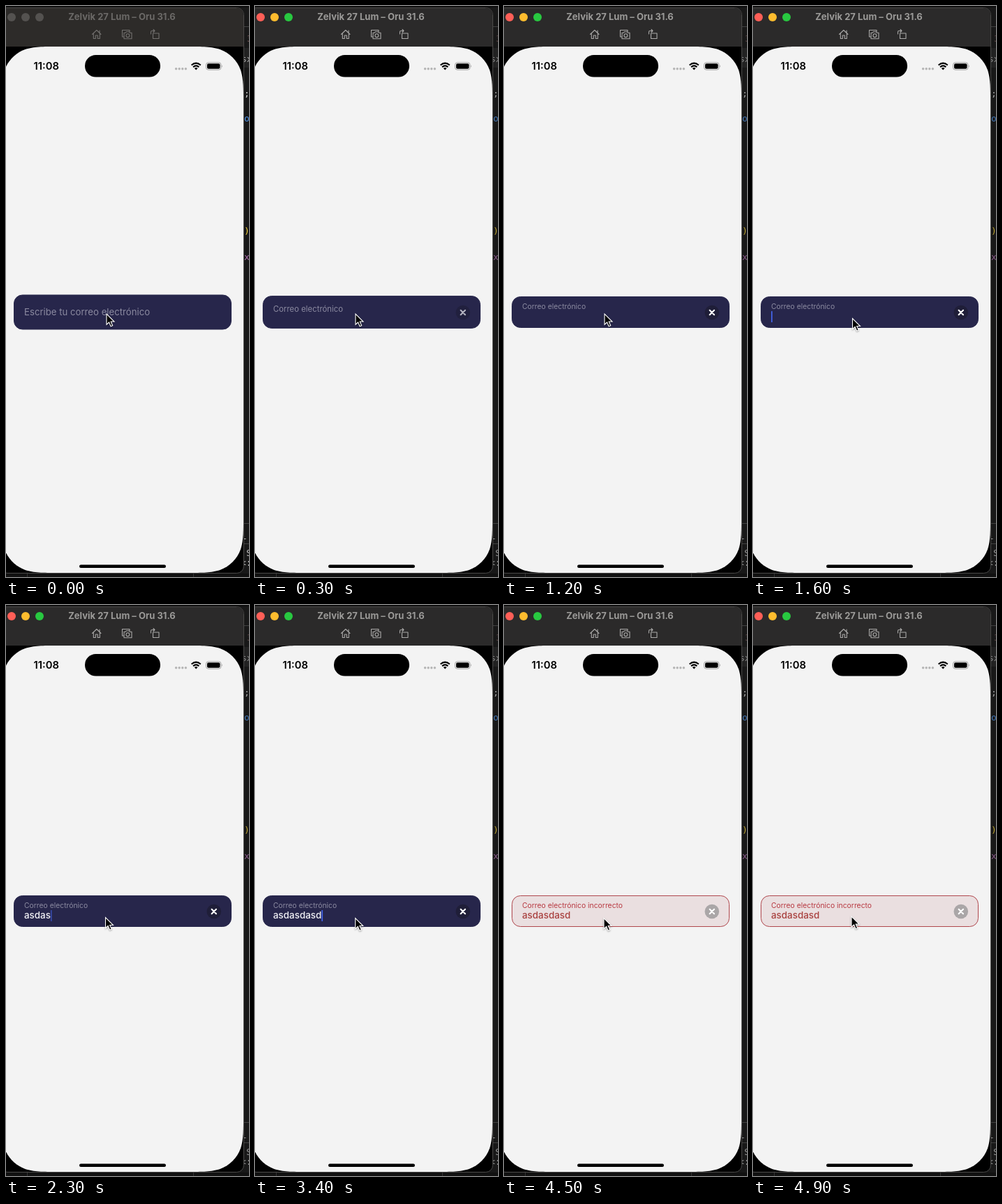
Write an HTML page that moves like this. It is 348x816 px and loops after 5000 ms.

```html
<!DOCTYPE html>
<html lang="es">
<head>
<meta charset="utf-8">
<title>Campo de correo</title>
<style>
  html, body { margin: 0; width: 100%; height: 100%; overflow: hidden; background: #181818; }
  svg { display: block; font-family: Inter, "Open Sans", sans-serif; }
  .code { font: 13px "DejaVu Sans Mono", "Noto Sans Mono", monospace; }
  .icons { fill: none; stroke-width: 1.1; stroke-linejoin: round; stroke-linecap: round; }
  #value { font-size: 13.4px; font-weight: 500; }
  #cursor { filter: drop-shadow(0 1px 1px rgba(0, 0, 0, .35)); }
</style>
</head>
<body>
<svg width="348" height="816" viewBox="0 0 348 816">
  <!-- editor behind the window -->
  <rect width="348" height="816" fill="#181818"/>
  <rect width="348" height="2" fill="#0d0d0d"/>
  <path d="M341 29.5H348M341 739.5H348M341 768.5H348" stroke="#414141"/>
  <rect x="341" y="60" width="7" height="28" fill="#222"/>
  <rect y="811" width="348" height="5" fill="#111"/>
  <path d="M30.5 811V816M268.5 811V816" stroke="#333"/>
  <g class="code" id="code">
    <text x="345" y="51" fill="#6e5050">3</text>
    <text x="337" y="80" fill="#aaa">sx</text>
    <text x="341" y="129" fill="#d4d4d4">;</text>
    <text x="341" y="165" fill="#4f94e8">o</text>
    <text x="341" y="326" fill="#f2d13a">)</text>
    <text x="341" y="363" fill="#b070b0">x</text>
    <text x="338" y="765" fill="#bbb">-</text>
    <text x="344" y="786" fill="#bbb">S</text>
    <text x="336" y="800" fill="#ccc">&lt;:</text>
  </g>

  <!-- simulator window -->
  <rect x="-8" y="2.5" width="348.5" height="808" rx="10" fill="#000" stroke="#4b4a49"/>
  <path id="bar" d="M0 3H330Q340 3 340 13V58H0Z"/>
  <g id="lights">
    <circle cx="8" cy="16" r="6"/><circle cx="28" cy="16" r="6"/><circle cx="48" cy="16" r="6"/>
  </g>
  <text id="title" x="166" y="20" text-anchor="middle" font-size="13" font-weight="700">Zelvik 27 Lum – Oru 31.6</text>
  <g class="icons" id="icons">
    <path d="M123.5 40.5L129.8 34.5L136 40.5M125.3 39.5V46.5H128.3V42H131.3V46.5H134.3V39.5M134 35V38"/>
    <path d="M168.5 44H166.5V34.5H177V36.5M169 38.2H171.3L172.3 36.7H176.3L177.3 38.2H180V46.7H169Z"/>
    <circle cx="174.4" cy="42.2" r="2.4"/>
    <path d="M210.5 39H219V46.5H210.5ZM207.5 40V37Q207.5 35.5 209 35.5H213M211 33.5L213 35.5L211 37.5"/>
  </g>

  <!-- phone screen -->
  <path id="screen" fill="#f3f3f3"/>
  <text x="39.5" y="91.3" font-size="14.8" font-weight="600">11:08</text>
  <rect x="113" y="70" width="108" height="31.5" rx="15.75"/>
  <g fill="#b5b5b5">
    <circle cx="243.6" cy="89.7" r="1.7"/><circle cx="248.2" cy="89.7" r="1.7"/>
    <circle cx="252.8" cy="89.7" r="1.7"/><circle cx="257.4" cy="89.7" r="1.7"/>
  </g>
  <g fill="none" stroke="#000" stroke-width="2">
    <path d="M265.6 84.6Q272.2 78.6 278.8 84.6M268 87.2Q272.2 83.5 276.4 87.2"/>
  </g>
  <path d="M269.8 88.9Q272.2 87 274.6 88.9L272.2 91.4Z"/>
  <rect x="286.5" y="80.8" width="21.5" height="10.4" rx="3.3" fill="none" stroke="#a2a2a2"/>
  <rect x="288" y="82.3" width="18.5" height="7.4" rx="2"/>
  <path d="M309.2 84.3Q311 86 309.2 87.8Z" fill="#a2a2a2"/>
  <rect x="105" y="798.6" width="124" height="4.4" rx="2.2"/>

  <!-- input -->
  <rect id="field" x="11.5" width="311" rx="12"/>
  <text id="label" x="26"></text>
  <text id="value" x="26" y="448.4"></text>
  <rect id="caret" y="436" width="1.8" height="16" rx=".6" fill="#4262e4"/>
  <g id="clear">
    <circle cx="297.8" cy="438" r="10.3"/>
    <path d="M294.6 434.8L301 441.2M301 434.8L294.6 441.2" stroke="#fff" stroke-width="2.1" stroke-linecap="round"/>
  </g>
  <path id="cursor" d="M0 0V15.2L3.6 12L6.1 17.8L8.7 16.7L6.2 11H11Z" stroke="#fff" stroke-width="1.1"/>
</svg>
<script>
const LOOP = 5000, STEP = 100, ERROR_AT = 3500;
const $ = id => document.getElementById(id);
const set = (id, attrs) => {
  for (const name in attrs) $(id).setAttribute(name, attrs[name]);
};
const mix = (a, b, p) => a + (b - a) * p;

// Rectangle with continuous corners: each one eases into its arc.
function smoothRect(left, top, width, height, radius) {
  const half = [[1.529, 0], [1.088, 0], [.868, 0], [.631, .075], [.373, .169]];
  const corner = [...half, ...half.map(([u, v]) => [v, u]).reverse()];
  const place = (right, bottom) => corner.map(([u, v]) => [
    right ? left + width - u * radius : left + u * radius,
    bottom ? top + height - v * radius : top + v * radius
  ]);
  const corners = [place(1, 0), place(1, 1).reverse(), place(0, 1), place(0, 0).reverse()];
  return 'M' + corners.map(([first, ...curve]) => `${first}C${curve.join(' ')}`).join('L') + 'Z';
}

// Rows are [start time, state]; each state holds until the next row.
const typed = [[0, 0], [1900, 1], [2100, 2], [2200, 4], [2300, 5], [2400, 6], [2500, 7], [2600, 8], [2700, 9]];
const pointer = [
  [0, [144, 440]], [1400, [146, 443]], [1500, [144, 445]], [1600, [142.5, 446.5]],
  [2800, [143.7, 447.5]], [4200, [143.7, 448]], [4500, [143, 447.5]], [4700, [142, 446.5]], [4900, [141, 445]]
];
const at = (table, t) => table.findLast(row => row[0] <= t)[1];

// The caret fades in and out once every 900 ms.
function caretOpacity(t) {
  if (t < 1400 || t >= ERROR_AT) return 0;
  const phase = (t - 1400) % 900;
  if (phase < 200) return phase < 100 ? .6 : .85;
  return phase < 400 ? 1 : phase < 500 ? .5 : 0;
}

function draw(t) {
  const active = t >= 100, error = t >= ERROR_AT;
  const x = Math.min(1, Math.max(0, t / 500));
  const open = x * x * (3 - 2 * x);

  set('bar', { fill: active ? '#2b2a2a' : '#2d2b29' });
  set('title', { fill: active ? '#9b9a98' : '#6b6967' });
  set('icons', { stroke: active ? '#aaa9a8' : '#73716f' });
  set('code', { opacity: active ? .75 : 1 });
  const lights = active ? ['#ff5f57', '#febc2e', '#28c840'] : Array(3).fill('#545250');
  [...$('lights').children].forEach((dot, i) => dot.setAttribute('fill', lights[i]));

  set('field', {
    y: mix(413, 415.5, open), height: mix(49, 44, open),
    fill: error ? '#eadfe0' : '#27264b', stroke: error ? '#b0474d' : '#27264b'
  });
  $('label').textContent = error ? 'Correo electrónico incorrecto'
    : active ? 'Correo electrónico' : 'Escribe tu correo electrónico';
  set('label', {
    y: mix(442.4, 433.4, open), 'font-size': mix(13.2, 10.35, open),
    fill: error ? '#b83a42' : '#8b8aa0'
  });
  $('value').textContent = 'asdasdasd'.slice(0, at(typed, t));
  set('value', { fill: error ? '#a9413f' : '#f2f2f6' });
  set('caret', { x: 26 + $('value').getComputedTextLength(), opacity: caretOpacity(t) });
  set('clear', { opacity: open, fill: error ? '#aaa6a7' : '#1f1e38' });
  set('cursor', { transform: `translate(${at(pointer, t)})` });
}

set('screen', { d: smoothRect(-6, 58, 346, 752, 53) });
const start = performance.now();
function frame() {
  const t = (performance.now() - start) % LOOP;
  draw(Math.floor(t / STEP) * STEP);
  requestAnimationFrame(frame);
}
draw(0);
requestAnimationFrame(frame);
</script>
</body>
</html>
```
